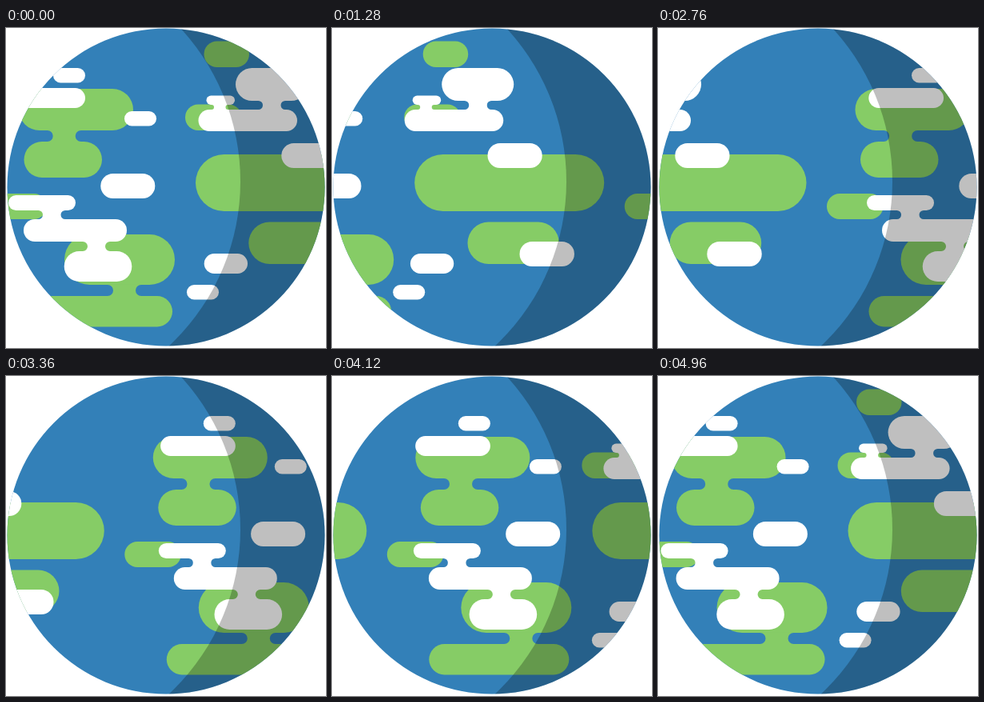
Write an HTML page that moves like this. It is 400x400 px and loops after 5 s.

```html
<!DOCTYPE html>
<html lang="en">
<head>
<meta charset="utf-8">
<title>Turning globe</title>
<style>
html, body { margin: 0; width: 100%; height: 100%; overflow: hidden; background: #fff; }
svg { display: block; width: 100%; height: 100%; }
</style>
</head>
<body>
<svg viewBox="0 0 400 400">
  <defs>
    <clipPath id="disc"><circle cx="200" cy="199" r="198.5"/></clipPath>
    <mask id="night">
      <rect width="400" height="400" fill="#fff"/>
      <circle cx="11" cy="191.7" r="282" fill="#000"/>
    </mask>
  </defs>
  <g clip-path="url(#disc)">
    <rect width="400" height="400" fill="#3380b8"/>
    <g id="land" fill="#86cc66"></g>
    <g id="clouds" fill="#fff"></g>
    <rect width="400" height="400" fill="#000" fill-opacity=".25" mask="url(#night)"/>
  </g>
</svg>
<script>
const LOOP = 5000, STEP = 40, TURN = 4965;

// Rounded bar from (x1, y1) to (x2, y2)
const pill = (x1, y1, x2, y2) =>
  `<rect x="${x1}" y="${y1}" width="${x2 - x1}" height="${y2 - y1}" rx="${(y2 - y1) / 2}"/>`;

// Bridge between two bars, with half-round notches on both sides
const neck = (x1, y1, x2, y2) => {
  const r = (y2 - y1) / 2;
  return `<path d="M${x1 - r} ${y1 - .5}H${x2 + r}V${y1}A${r} ${r} 0 0 0 ${x2 + r} ${y2}` +
    `V${y2 + .5}H${x1 - r}V${y2}A${r} ${r} 0 0 0 ${x1 - r} ${y1}Z"/>`;
};

const land = [
  pill(16, 76, 159, 128), neck(58.7, 128, 86.7, 142), pill(22.5, 142, 120, 187),
  pill(-19.5, 207, 51, 239),
  pill(73, 258, 211, 321), neck(134, 321, 162, 335), pill(33, 335, 208, 373.5),
  pill(247.5, 16.5, 304, 49),
  pill(224, 95.5, 294.5, 128),
  pill(237, 158, 474, 229),
  pill(303.3, 242.5, 417.7, 295)
];

const clouds = [
  pill(59, 50, 99, 68.5),
  pill(5.3, 75, 99, 100),
  pill(148, 104, 188, 122.5),
  pill(118.3, 182, 186.3, 213),
  pill(3, 209, 87, 228), neck(46, 228, 68.5, 239),
  pill(22, 239, 151, 267), neck(102, 267, 124, 279),
  pill(72.7, 279, 157.3, 317),
  pill(247.7, 282, 302, 307),
  pill(226, 321, 266, 339.5),
  pill(287, 50, 377, 91), neck(321, 91, 343.5, 102),
  pill(250.5, 84.5, 286, 96), neck(260, 96, 274.5, 102),
  pill(240.5, 102, 364, 129),
  pill(344.3, 144, 412.5, 175),
  pill(384.3, 267, 452.7, 298)
];

function layer(id, shapes, span) {
  const g = document.getElementById(id), art = shapes.join("");
  g.innerHTML = `<g>${art}</g><g transform="translate(${span})">${art}</g>`;
  return turn => g.setAttribute("transform", `translate(${-span * turn})`);
}

const layers = [layer("land", land, 519), layer("clouds", clouds, 581)];

function draw(now) {
  const t = Math.floor((now % LOOP) / STEP) * STEP;
  layers.forEach(move => move(t / TURN));
}

const start = performance.now();
function tick() {
  draw(performance.now() - start);
  requestAnimationFrame(tick);
}
tick();
</script>
</body>
</html>
```
